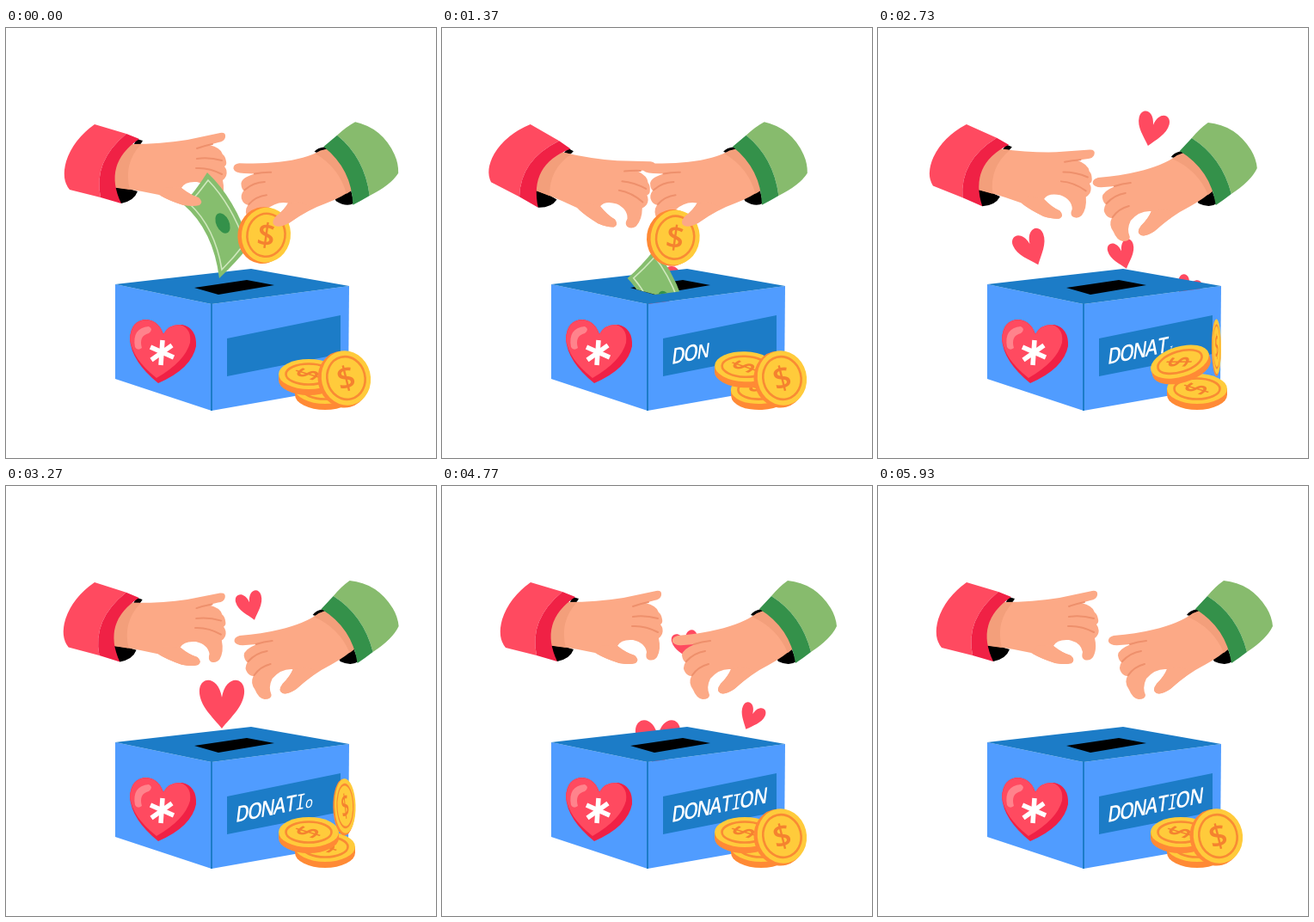
Animation, 500 px wide and 500 px high, one loop 6.03 s. Source, as an HTML page:

```html
<!DOCTYPE html>
<html lang="en">
<head>
<meta charset="utf-8">
<title>Donation box</title>
<style>
  html, body { margin: 0; width: 100%; height: 100%; overflow: hidden; background: #fff; }
  svg { display: block; width: 100vw; height: 100vh; }
  .skin { fill: #fca986; }
  .shade { fill: #f39f7b; }
  .crease { fill: none; stroke: #ee906c; stroke-width: 2; stroke-linecap: round; }
  .rim { fill: #ff8a35; }
  .face { fill: #ffcb3b; }
  .ring { fill: none; stroke: #f98b34; stroke-width: 2.6; }
  .sign { fill: #f5822f; font: 600 37px "Open Sans", sans-serif; text-anchor: middle; }
  .letter { fill: #fff; font: 600 26px "Open Sans", sans-serif; }
  .serif { font: 500 25px "Noto Sans Mono", monospace; }
</style>
</head>
<body>
<svg viewBox="0 0 500 500">
  <defs>
    <clipPath id="aboveSlot">
      <path d="M0 0H500V314H316L311 302L248 310L219 302H0Z"/>
    </clipPath>
    <path id="heart" d="M0 21C-7 12 -18 3 -18 -9C-18 -21 -3 -22 0 -4C3 -22 18 -21 18 -9C18 3 7 12 0 21Z" fill="#ff4a60"/>
    <g id="coin">
      <ellipse class="rim" cx="-1.5" cy=".8" rx="29.5" ry="33"/>
      <ellipse class="face" cx="2" rx="28.5" ry="32"/>
      <ellipse class="ring" cx="2" rx="22" ry="25"/>
      <text class="sign" x="2" y="13">$</text>
    </g>
    <g id="flatCoin">
      <path class="rim" d="M-35 -3.5V3.5A35 17.5 0 0 0 35 3.5V-3.5Z"/>
      <ellipse class="face" cy="-3.5" rx="35" ry="17.5"/>
      <ellipse class="ring" cy="-3.5" rx="26.5" ry="12"/>
      <text class="sign" transform="translate(0 -3.5) scale(1.05 .58) rotate(-62)" y="12">$</text>
    </g>
  </defs>

  <g id="hearts"></g>

  <g id="box">
    <path d="M127 298L239 321V445L127 408Z" fill="#509cff"/>
    <path d="M239 321L399 300L398 417L239 445Z" fill="#509cff"/>
    <path d="M127 298L285 280L399 300L239 321Z" fill="#1c7cc7"/>
    <path d="M219 302L280 293L312 299L247 310Z"/>
    <path d="M239 320V445" stroke="#1c7cc7" stroke-width="2"/>
    <path d="M257 361L389 334V379L257 405Z" fill="#1c7cc7"/>
    <path d="M177 413Q146 388 144 362Q145 339 164 339Q178 341 183 356Q189 344 205 345Q222 349 221 370Q216 396 177 413Z" fill="#f02145"/>
    <path d="M175 407Q147 385 144 362Q145 339 164 339Q178 341 183 356Q189 344 203 345Q216 350 214 366Q208 388 175 407Z" fill="#ff4a60"/>
    <path d="M150 371Q146 349 166 347Q172 350 166 355Q154 358 158 372Q153 376 150 371Z" fill="#ff838c"/>
    <path d="M182 363L180 392M168 371L195 383M193 369L169 386" stroke="#fff" stroke-width="5.5"/>
  </g>
  <g id="label"></g>

  <use id="low" href="#flatCoin"/>
  <use id="mid" href="#flatCoin"/>
  <use id="front" href="#coin"/>

  <g class="left">
    <path d="M152 129L159 131Q156 137 150 140L140 186L153 190Q149 201 134 204L120 190Z"/>
    <path class="skin" d="M146 135Q180 135 211 130L249 122Q256 121 255 127Q254 132 247 133L236 136Q250 139 252 147Q255 149 256 155Q257 159 254 161Q258 166 256 172Q254 176 252 177Q255 190 250 199Q246 204 240 202Q236 200 238 193Q236 182 222 179Q208 178 204 186Q214 194 224 197Q230 202 225 206Q218 208 206 206Q188 200 178 194Q160 190 140 187L115 184L125 150Z"/>
    <path class="shade" d="M144 135L157 135Q136 158 144 188L115 184L125 150Z"/>
    <path class="crease" d="M222 140Q230 137 240 135M222 152Q236 150 251 154M221 163Q236 162 251 170"/>
    <path d="M103 112L140 123Q101 155 110 197L74 188Q64 176 70 155Q78 130 103 112Z" fill="#ff4a60"/>
    <path d="M140 123L155 129Q112 158 134 204L110 197Q101 155 140 123Z" fill="#f02145"/>
  </g>

  <g class="right">
    <path d="M359 150Q362 145 371 143L400 170L412 204Q404 210 391 204L386 196Q400 190 408 185L366 152Z"/>
    <path class="skin" d="M366 148Q350 160 320 167Q300 172 274 174Q267 176 268 181Q270 186 281 185L294 184Q279 190 279 197Q280 203 283 205Q279 212 283 217Q286 221 290 221Q286 229 292 237Q296 247 303 248Q311 248 311 243Q307 234 312 224Q322 212 336 213Q333 221 324 230Q318 238 324 241Q330 243 340 236Q360 218 380 208Q398 198 410 187L410 160L374 145Z"/>
    <path class="shade" d="M374 145L360 152Q390 165 402 194L411 187L410 160Z"/>
    <path class="crease" d="M293 184Q302 181 312 180M284 204Q293 194 306 192M291 220Q298 210 310 207"/>
    <path d="M402 110Q434 113 452 142Q458 152 459 163Q452 178 429 193Q418 150 383 128Q392 117 402 110Z" fill="#87bb6d"/>
    <path d="M383 128L369 143Q405 165 411 206Q420 200 429 193Q418 150 383 128Z" fill="#34914a"/>
  </g>

  <g clip-path="url(#aboveSlot)">
    <g id="bill">
      <path d="M234 168Q266 198 284 252Q268 272 248 291Q241 235 206 205Q220 190 234 168Z" fill="#86be6e"/>
      <path d="M235 177Q262 205 278 250Q265 267 251 281Q243 232 213 204Q224 192 235 177Z" fill="none" stroke="#cfe8bd" stroke-width="1.6"/>
      <ellipse cx="252" cy="227" rx="7.5" ry="12.5" transform="rotate(-25 252 227)" fill="#34914a"/>
    </g>
    <use id="gift" href="#coin"/>
  </g>

  <path class="left skin" d="M185 185L204 186Q214 194 224 197Q230 202 225 206Q218 208 206 206Q190 201 180 195Z"/>
  <path class="right skin" d="M350 210L336 213Q333 221 324 230Q318 238 324 241Q330 243 340 236Q352 225 366 215Z"/>
</svg>

<script>
const LOOP = 6030, REST = 5930;
const NS = "http://www.w3.org/2000/svg";
const $ = id => document.getElementById(id);
const clamp = v => Math.min(1, Math.max(0, v));
const part = (t, from, to) => clamp((t - from) / (to - from));
const easeInOut = u => (1 - Math.cos(Math.PI * u)) / 2;
const easeOut = u => Math.sin(u * Math.PI / 2);
const hump = u => Math.sin(Math.PI * u);
const set = (el, transform) => el.setAttribute("transform", transform);
const show = (el, on) => el.setAttribute("visibility", on ? "visible" : "hidden");

function add(parent, tag, attrs) {
  const el = document.createElementNS(NS, tag);
  for (const key in attrs) el.setAttribute(key, attrs[key]);
  return parent.appendChild(el);
}

// Linear interpolation through [time, value] steps
function along(t, steps) {
  let value = steps[0][1];
  for (let i = 1; i < steps.length; i++) {
    const [t0, v0] = steps[i - 1], [t1, v1] = steps[i];
    if (t >= t0) value = v0 + (v1 - v0) * part(t, t0, t1);
  }
  return value;
}

const letterX = [268, 282, 297, 312, 326, 337, 347, 363];
const letters = [..."DONATION"].map((ch, i) => {
  const el = add($("label"), "text", { class: ch === "I" ? "letter serif" : "letter" });
  el.textContent = ch;
  return { el, x: letterX[i], y: 391 - (letterX[i] - 268) * 0.205, start: 130 + 500 * i };
});

// Each column releases the same heart several times
const columns = [
  { x: 178, tilt: -22, size: 1.05, life: 800, starts: [600, 2380, 3695], y: a => 325 - 0.2 * a },
  { x: 251, tilt: 0, size: 1.45, life: 1420, starts: [1290, 2970, 4670], y: a => 322 - 227 * easeOut(a / 1500) },
  { x: 284, tilt: -16, size: 0.85, life: 1230, starts: [860, 2560, 4260], y: a => 302 - 0.23 * a },
  { x: 319, tilt: 14, size: 1, life: 980, starts: [350, 1860, 3490, 5180], y: a => 310 - 0.222 * a },
  { x: 360, tilt: 24, size: 0.78, life: 900, starts: [760, 2665, 4553], y: a => 318 - 0.23 * a }
];
const hearts = columns.flatMap(c => c.starts.map(start =>
  ({ ...c, start, el: add($("hearts"), "use", { href: "#heart" }) })));

const leftParts = document.querySelectorAll(".left");
const rightParts = document.querySelectorAll(".right");

function drawHearts(t) {
  for (const h of hearts) {
    const age = t - h.start;
    const on = age > 0 && age < h.life && t < REST;
    show(h.el, on);
    if (!on) continue;
    const size = h.size * clamp((h.life - age) / 100);
    set(h.el, `translate(${h.x} ${h.y(age)}) rotate(${h.tilt}) scale(${size})`);
  }
}

function drawLabel(t) {
  for (const l of letters) {
    const s = part(t, l.start, l.start + 270);
    show(l.el, s > 0);
    set(l.el, `translate(${l.x + 3 * (1 - s)} ${l.y}) matrix(.82 -.167 -.12 1 0 0) scale(${s}) translate(-2 0)`);
  }
}

function drawPile(t) {
  const lowTilt = along(t, [[100, 0], [770, -20], [1970, 14], [2600, 0]]);
  set($("low"), `translate(371 ${423 - 50 * hump(part(t, 100, 1300))}) rotate(${lowTilt})`);

  const midTilt = along(t, [[1300, 0], [1970, 20], [2730, -17], [2850, 0]]);
  set($("mid"), `translate(352 ${406 - 61 * hump(part(t, 1300, 2850))}) rotate(${midTilt})`);

  const u = part(t, 2050, 3900);
  const spin = Math.max(0.18, Math.abs(Math.cos(4 * Math.PI * u)));
  set($("front"), `translate(393.5 ${407.5 - 40 * hump(u)}) scale(${spin} 1) rotate(-14)`);
}

const reach = t => easeInOut(part(t, 0, 1600)) - easeInOut(part(t, 2030, 3530));

function drawHands(t) {
  const r = reach(t);
  const grip = 7 * (1 - easeInOut(part(t, 1550, 2200)));
  leftParts.forEach(el => set(el, `rotate(${14 * r} 103 111)`));
  rightParts.forEach(el => set(el, `translate(${-33 * r} 0) rotate(${grip} 410 143)`));
}

function drawGifts(t) {
  const drop = part(t, 800, 1700);
  show($("bill"), drop < 1);
  set($("bill"), `translate(${20 * clamp(drop * 3)} ${150 * drop ** 1.5}) rotate(${12 * reach(Math.min(t, 800))} 103 111)`);

  const held = reach(Math.min(t, 1600));
  const fall = part(t, 1600, 2200);
  show($("gift"), fall < 1);
  const x = 300.5 - 33 * held + 20 * clamp(fall * 1.6);
  const y = 240.5 + 3 * held + 140 * fall * fall;
  set($("gift"), `translate(${x} ${y}) rotate(8)`);
}

const origin = performance.now();
function frame() {
  const t = (performance.now() - origin) % LOOP;
  drawHearts(t);
  drawLabel(t);
  drawPile(t);
  drawHands(t);
  drawGifts(t);
  requestAnimationFrame(frame);
}
frame();
</script>
</body>
</html>
```
